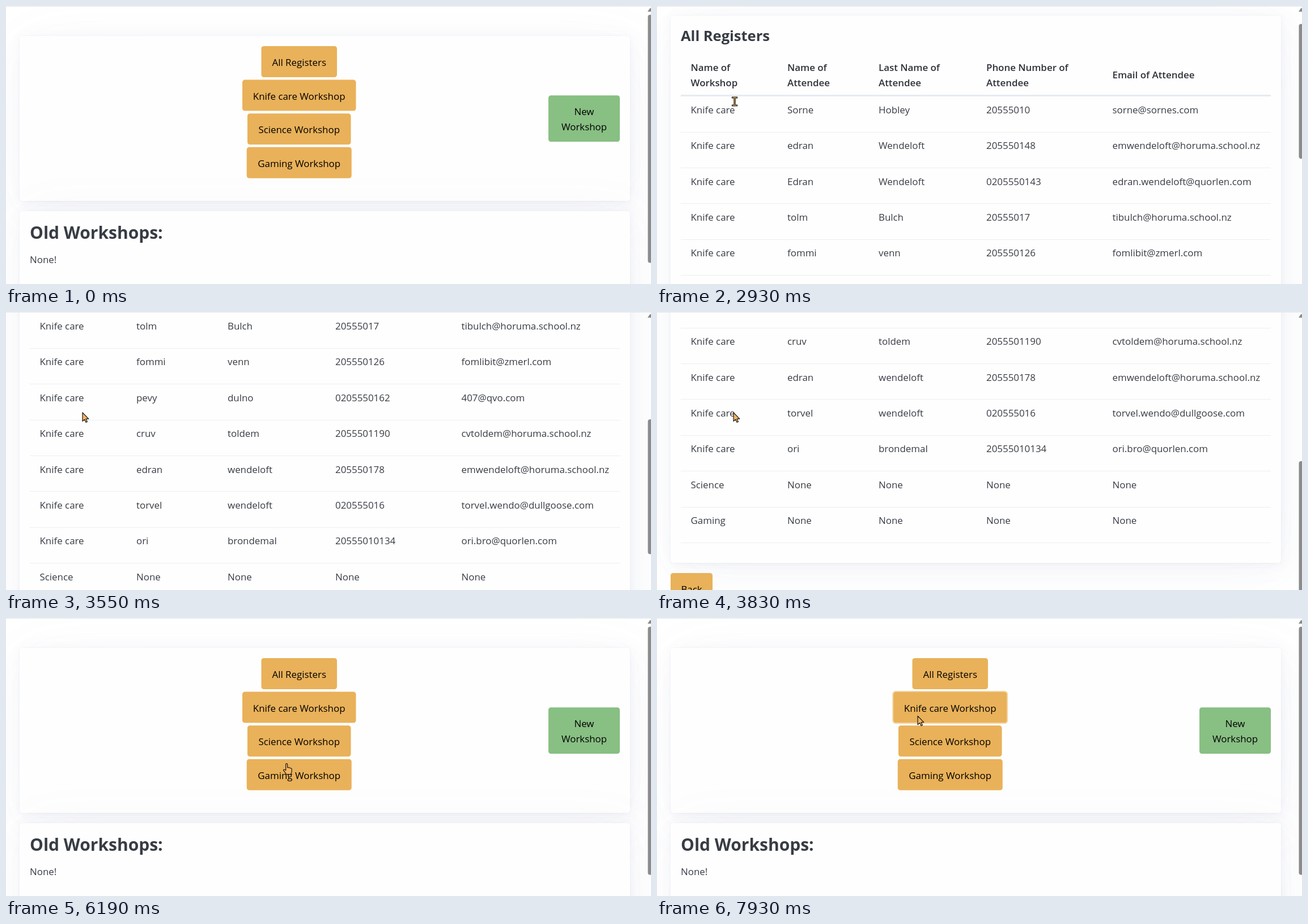
These frames come from a looping animation (1138x492 px, 8 s). An HTML page:

```html
<!DOCTYPE html>
<html lang="en">
<head>
<meta charset="utf-8">
<title>Workshop registers</title>
<style>
  html, body { margin: 0; width: 100%; height: 100%; overflow: hidden; background: #fff; }
  #stage { position: relative; width: 1138px; height: 492px; overflow: hidden; }
  .page { position: absolute; left: 0; top: 0; width: 1138px; height: 1080px; }
  .card {
    position: absolute; left: 24px; width: 1077px; border-radius: 4.5px; background: #fefefe;
    box-shadow:
      .3px .5px 3px rgba(129,145,181,.017), .6px 1.2px 7px rgba(129,145,181,.024),
      1px 2px 13px rgba(129,145,181,.03), 2px 4px 24px rgba(129,145,181,.036),
      4px 8px 45px rgba(129,145,181,.043), 9px 18px 108px rgba(129,145,181,.06),
      0 0 0 1px rgba(129,145,181,.03);
  }
  svg { position: absolute; left: 0; top: 0; width: 1138px; height: 100%; overflow: hidden; }
  text { font: 16.9px "Open Sans", "Noto Sans", sans-serif; fill: #373c44; white-space: pre; }
  .th { font-weight: 600; fill: #2d3138; }
  .h1 { font-size: 30px; font-weight: 700; }
  .h2 { font-size: 25.5px; font-weight: 700; }
  .label { fill: #000; text-anchor: middle; }
  .ring { fill: none; stroke: #f2d3a0; stroke-width: 2; }
  #cursor path { fill: #f5b562; stroke: #1c1a18; stroke-width: 1.2; stroke-linejoin: round; }
</style>
</head>
<body>
<div id="stage">
  <div class="page" id="home">
    <div class="card" style="top:53px;height:292px"></div>
    <div class="card" style="top:363px;height:400px"></div>
    <svg></svg>
  </div>
  <div class="page" id="list">
    <div class="card" style="top:53px;height:939px"></div>
    <svg></svg>
  </div>
  <svg id="chrome">
    <rect width="1138" height="1" fill="#e8e8ea"/>
    <path d="M1132 10L1136 4H1138V10Z" fill="#8b8b8b"/>
    <rect id="thumb" x="1132.5" width="12" rx="4" fill="#8b8b8b"/>
    <g id="cursor"><path/></g>
  </svg>
</div>
<script>
const $ = id => document.getElementById(id);
const home = $('home').querySelector('svg');
const list = $('list').querySelector('svg');

function add(parent, tag, attrs, content = '') {
  const el = document.createElementNS('http://www.w3.org/2000/svg', tag);
  for (const key in attrs) el.setAttribute(key, attrs[key]);
  el.textContent = content;
  parent.append(el);
  return el;
}
const write = (parent, x, y, content, cls = '') => add(parent, 'text', { x, y, class: cls }, content);

// Draws a button and returns its focus ring.
function button(parent, x, y, width, height, lines, fill = '#e9b159') {
  add(parent, 'rect', { x, y, width, height, rx: 4.5, fill });
  lines.forEach((line, i) => write(parent, x + width / 2, Math.round(y + 35) + i * 27, line, 'label'));
  return add(parent, 'rect', { x: x - .7, y: y - .7, width: width + 1.4, height: height + 1.4, rx: 5, class: 'ring' });
}

const rings = [
  ['All Registers', 133.5], ['Knife care Workshop', 200.5],
  ['Science Workshop', 182.5], ['Gaming Workshop', 185]
].map(([label, w], i) => button(home, 517.2 - w / 2, 71 + i * 59.6, w, 55, [label]));
rings.push(button(home, 957, 158.3, 126, 82, ['New', 'Workshop'], '#88bf83'));
write(home, 42, 412, 'Old Workshops:', 'h1');
write(home, 42, 455, 'None!');

const columns = [59.5, 230, 391, 581, 803.5];
const headers = ['Name of|Workshop', 'Name of|Attendee', 'Last Name of|Attendee', 'Phone Number of|Attendee', 'Email of Attendee'];
const rows = [
  'Sorne,Hobley,20555010,sorne@sornes.com',
  'edran,Wendeloft,205550148,emwendeloft@horuma.school.nz',
  'Edran,Wendeloft,0205550143,edran.wendeloft@quorlen.com',
  'tolm,Bulch,20555017,tibulch@horuma.school.nz',
  'fommi,venn,205550126,fomlibit@zmerl.com',
  'pevy,dulno,0205550162,407@qvo.com',
  'cruv,toldem,2055501190,cvtoldem@horuma.school.nz',
  'edran,wendeloft,205550178,emwendeloft@horuma.school.nz',
  'torvel,wendeloft,020555016,torvel.wendo@dullgoose.com',
  'ori,brondemal,20555010134,ori.bro@quorlen.com'
].map(row => ['Knife care', ...row.split(',')]);
for (const name of ['Science', 'Gaming']) rows.push([name, 'None', 'None', 'None', 'None']);

write(list, 42, 98, 'All Registers', 'h2');
headers.forEach((header, c) => {
  const lines = header.split('|');
  lines.forEach((line, i) => write(list, columns[c], (lines[1] ? 151 : 164) + i * 27, line, 'th'));
});
add(list, 'rect', { x: 42, y: 193, width: 1041, height: 3, fill: '#e7eaf0' });
rows.forEach((row, r) => {
  const y = 225.7 + r * 63.4;
  row.forEach((cell, c) => write(list, columns[c], Math.round(y), cell));
  add(list, 'rect', { x: 42, y: Math.round(y + 32.8), width: 1041, height: 1, fill: '#eceef2' });
});
const backRing = button(list, 24, 1010, 74, 55, ['Back']);

const shapes = {
  arrow: 'M0 0V15.3L3.5 12.2 6 17.3 8.4 16.2 6 11.2H10.8Z',
  hand: 'M-1.5 11V1.7Q-1.5 0 0 0T1.5 1.7V7.2Q3.4 6 4.3 7.7Q6.3 6.8 7 8.5Q9 8 9 10V14L7.3 19H-1.2L-2 16.5-5.7 12Q-5.2 9-1.5 12Z',
  beam: 'M-4.5-8H4.5V-6H1.1V6H4.5V8H-4.5V6H-1.1V-6H-4.5Z'
};
// time, x, y, pointer shape from then on
const path = [
  [370, 968, 480, 'arrow'], [620, 800, 400, 'arrow'], [860, 590, 290, 'hand'], [1120, 478, 194, 'hand'],
  [1500, 490, 115, 'hand'], [1780, 497, 102, 'arrow'], [2120, 497, 102, 'arrow'], [2480, 300, 138, 'arrow'],
  [2850, 137, 169, 'beam'], [3080, 137, 169, 'arrow'], [3150, 135, 178, 'arrow'], [3900, 135, 178, 'arrow'],
  [4630, 79, 460, 'hand'], [4880, 75, 458, 'arrow'], [4960, 75, 458, 'arrow'], [5230, 95, 438, 'arrow'],
  [5500, 149, 382, 'arrow'], [6050, 430, 286, 'hand'], [6190, 495, 258, 'hand'], [6340, 514, 196, 'hand'],
  [7070, 538, 147, 'hand'], [7250, 538, 147, 'hand'], [7790, 462, 172, 'hand'], [7860, 460, 173.5, 'arrow']
];
const scrolling = [[2850, 0], [2930, 36], [3070, 36], [3550, 384], [3830, 548], [3970, 559]];

// Linear interpolation between keys of the form [time, ...values].
function sample(keys, t) {
  const next = keys.findIndex(key => key[0] > t);
  if (next < 0) return keys[keys.length - 1].slice(1);
  const a = keys[Math.max(0, next - 1)], b = keys[next];
  const k = next ? (t - a[0]) / (b[0] - a[0]) : 0;
  return a.slice(1).map((v, i) => typeof v === 'number' ? v + (b[i + 1] - v) * k : v);
}

const show = (el, on) => { el.style.display = on ? '' : 'none'; };

function draw(t) {
  const onList = t >= 2120 && t < 5230;
  const scroll = onList ? Math.round(sample(scrolling, t)[0]) : 0;
  show($('home'), !onList);
  show($('list'), onList);
  $('list').style.top = -scroll + 'px';
  $('thumb').setAttribute('y', 15.5 + scroll * .4535);
  $('thumb').setAttribute('height', onList ? 238.5 : 439);

  rings.forEach((ring, i) => show(ring, i === 1 && t >= 7860));
  show(backRing, t >= 4880);

  const [x, y, kind] = sample(path, t);
  show($('cursor'), t >= 370);
  $('cursor').setAttribute('transform', `translate(${x} ${y})`);
  $('cursor').firstElementChild.setAttribute('d', shapes[kind]);
}

function tick() {
  draw(performance.now() % 8000);
  requestAnimationFrame(tick);
}
tick();
</script>
</body>
</html>
```
